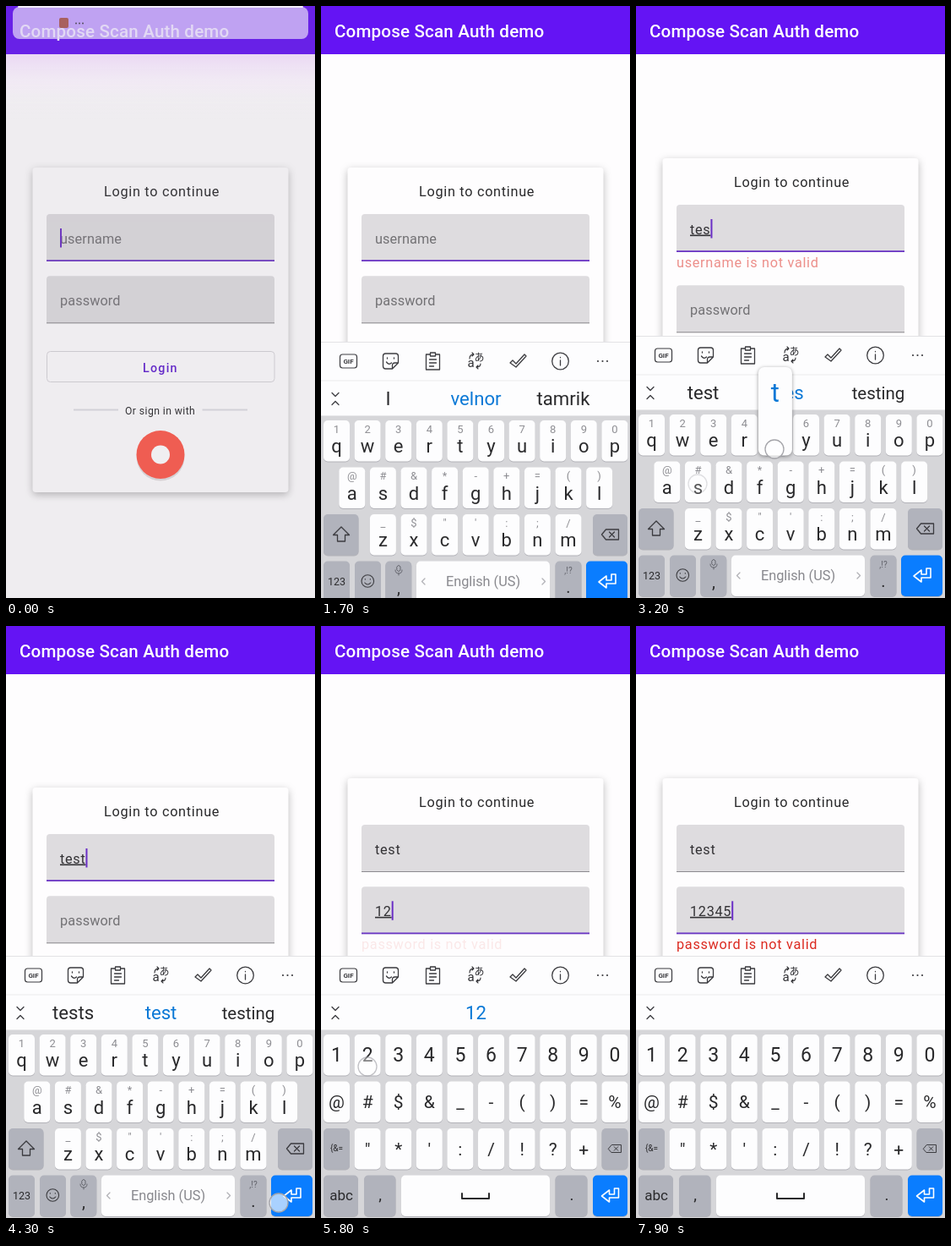
An HTML page that plays this animation: 366x700 px, repeating every 8000 ms.

```html
<!DOCTYPE html>
<html lang="en">
<head>
<meta charset="utf-8">
<title>Login demo</title>
<style>
html, body { margin: 0; width: 100%; height: 100%; overflow: hidden; background: #fefdfe; }
svg { display: block; width: 100vw; height: 100vh; font-family: Roboto, "Noto Sans", sans-serif; }
text { white-space: pre; }
#wash, #card, #lower, #userError, #passError, #keyboard { animation: 8s linear infinite; }
#wash { animation-name: wash; }
#card { animation-name: lift; filter: drop-shadow(0 3px 5px rgba(0, 0, 0, .27)); }
#lower { animation-name: makeRoom; }
#userError { animation-name: userError; }
#passError { animation-name: passError; }
#keyboard { animation-name: slide; }
@keyframes wash { 0%, 1.25% { opacity: 1 } 6.25%, 100% { opacity: 0 } }
@keyframes lift {
  0%, 32.5% { transform: none } 35.6%, 41.9% { transform: translateY(-11px) }
  45.6%, 68.1% { transform: none } 71.9%, 100% { transform: translateY(-11px) }
}
@keyframes makeRoom {
  0%, 32.5% { transform: none } 35.6%, 41.9% { transform: translateY(22px) }
  45.6%, 100% { transform: none }
}
@keyframes userError { 0%, 35.6% { opacity: 0 } 41.9% { opacity: .75 } 45%, 100% { opacity: 0 } }
@keyframes passError { 0%, 71.9% { opacity: 0 } 78%, 100% { opacity: 1 } }
@keyframes slide {
  0%, 15.6% { transform: translateY(312px); animation-timing-function: ease-out }
  22%, 100% { transform: none }
}
</style>
</head>
<body>
<svg id="stage" viewBox="0 0 366 700" preserveAspectRatio="none"></svg>
<script>
const LOOP = 8000, TAP_FADE = 150, BLINK = 500, FOCUS_PASS = 4400, NUMBERS = 4900;
const PURPLE = '#6414f4', INK = '#29292b', BLUE = '#0a78d6';

// Timed states: [start, value]
const userText = [[0, ''], [2500, 't'], [2750, 'te'], [3100, 'tes'], [3300, 'test']];
const passText = [[0, ''], [5400, '1'], [5750, '12'], [6150, '123'], [6500, '1234'], [7500, '12345']];
const suggestions = [
  [0, 'I|velnor|tamrik'], [2500, 'to|t|the'], [2750, 'the|te|test'], [3100, 'test|tes|testing'],
  [3300, 'tests|test|testing'], [FOCUS_PASS, '||'], [5050, '|1|'], [5750, '|12|'], [6150, '||']
];
const blinkStarts = [-200, ...userText.slice(1).map(s => s[0]), FOCUS_PASS, ...passText.slice(1).map(s => s[0])];

// Touches: x, y, down, up, key
const taps = [
  [172, 288, 780, 850],
  [164, 522, 2400, 2500, 't'], [92, 520, 2650, 2750, 'e'],
  [73, 565, 3000, 3100, 's'], [164, 524, 3150, 3300, 't'],
  [323, 682, 4250, 4400], [19, 675, 4800, 4900],
  [19, 520, 4980, 5050, '1'], [55, 521, 5650, 5750, '2'], [92, 521, 6050, 6150, '3'],
  [128, 521, 6400, 6500, '4'], [165, 521, 7400, 7500, '5']
];

const esc = s => s.replace(/&/g, '&amp;').replace(/</g, '&lt;');
const rect = (x, y, w, h, r, fill, more = '') =>
  `<rect x="${x}" y="${y}" width="${w}" height="${h}" rx="${r}" fill="${fill}" ${more}/>`;
const text = (x, y, size, fill, str, more = '') =>
  `<text x="${x}" y="${y}" font-size="${size}" fill="${fill}" ${more}>${esc(str)}</text>`;
const mid = (x, y, size, fill, str, more = '') => text(x, y, size, fill, str, `text-anchor="middle" ${more}`);
const icon = (x, y, d, color = '#3a3a3e', width = 1.3) =>
  `<path transform="translate(${x} ${y})" d="${d}" fill="none" stroke="${color}" stroke-width="${width}" stroke-linejoin="round" stroke-linecap="round"/>`;
const circle = r => `M${-r} 0a${r} ${r} 0 1 0 ${2 * r} 0a${r} ${r} 0 1 0 ${-2 * r} 0`;

const BACKSPACE = 'M-10 0l5-6h15v12h-15zM-1-3l6 6m0-6l-6 6';
const ENTER = 'M10-8v11h-11v5l-9-7 9-7v5h6v-7z';
const SMILE = 'M-3.5 2q3.5 4 7 0M-3-2.5v.6M3-2.5v.6';

const keyPos = {};
const GRAY = '#b1b3bc';
function cap(x, y, w, fill = '#fdfdfe') {
  return rect(x, y + 1, w, 48.5, 5, '#b2b2b8') + rect(x, y, w, 48.5, 5, fill);
}
function row(keys, x0, y, size, drop, hints) {
  return [...keys].map((ch, i) => {
    const x = x0 + 36.6 * i, cx = x + 15.5;
    keyPos[ch] = [cx, y];
    return cap(x, y, 31) + mid(cx, y + drop, size, INK, ch) +
      (hints ? mid(cx, y + 14.5, 13, '#8d8d92', hints[i]) : '');
  }).join('');
}

function field(id, hint) {
  return `<g id="${id}">
    <path d="M48 302v-52q0-4 4-4h262q4 0 4 4v52z" fill="#dedcdf"/>
    <rect class="line" x="48" width="270"/>
    ${text(64, 280.5, 16.27, '#727174', hint, 'class="hint" letter-spacing=".1"')}
    ${text(64, 280.5, 16.27, '#333235', '', 'class="value" letter-spacing=".7"')}
    <rect class="caret" y="263" width="2" height="22.5" fill="#6a2fc6"/>
  </g>`;
}

function page() {
  const error = (id, y, str) => text(48, y, 16.27, '#dc2a20', str, `id="${id}" letter-spacing=".7"`);
  return `
  ${rect(0, 0, 366, 700, 0, '#fefdfe')}
  ${rect(0, 0, 366, 57, 0, PURPLE)}
  ${text(16, 37, 20.6, '#fff', 'Compose Scan Auth demo', 'font-weight="500" letter-spacing=".15"')}
  <g id="card">
    ${rect(31.5, 191, 303, 384, 4, '#fefdfe')}
    ${text(116, 224.5, 16.27, INK, 'Login to continue', 'letter-spacing=".7"')}
    ${field('user', 'username')}
    ${error('userError', 320, 'username is not valid')}
    <g id="lower">
      <g transform="translate(0 73.3)">${field('pass', 'password')}</g>
      ${error('passError', 393, 'password is not valid')}
      ${rect(48.5, 408.5, 269.5, 36, 4, 'none', 'stroke="#d6d4d8"')}
      ${text(162, 432.5, 14.24, '#5f1fd0', 'Login', 'font-weight="500" letter-spacing="1.27"')}
      ${rect(80, 476.5, 53, 2, 0, '#dddce1')}${rect(232.5, 476.5, 53.5, 2, 0, '#dddce1')}
      ${text(141, 482.5, 12.2, INK, 'Or sign in with', 'letter-spacing=".42"')}
      <circle cx="183" cy="533" r="28.5" fill="#000" opacity=".12"/>
      <circle cx="183" cy="530.5" r="28.5" fill="#fe5849"/>
      <circle cx="183" cy="530.5" r="11" fill="#fff"/>
    </g>
  </g>`;
}

function toolbar() {
  return `
  ${rect(0, 390, 366, 312, 0, '#d6d6d9')}
  ${rect(0, 390, 366, 87.5, 0, '#fdfdfe')}
  ${rect(0, 390, 366, 1, 0, '#e2e2e5')}${rect(0, 435.5, 366, 1, 0, '#ebebee')}
  ${rect(22.5, 405, 20, 16, 3, 'none', 'stroke="#3a3a3e" stroke-width="1.2"')}
  ${mid(32.5, 416, 8, '#3a3a3e', 'GIF', 'font-weight="700"')}
  ${icon(82.5, 413, 'M9 2v-8q0-3-3-3h-12q-3 0-3 3v12q0 3 3 3h8zM9 2h-4q-3 0-3 3v4M-4-4v1M4-4v1M-5 1q3 4 6 1')}
  ${icon(132.5, 413, 'M-3-8h-5v18h16v-18h-5M-3-10h6v4h-6zM-4-2h8M-4 2h8M-4 6h5')}
  ${mid(177.5, 420, 15, '#2f2f33', 'a')}
  ${mid(187.5, 413, 12, '#2f2f33', 'あ', 'font-family="Noto Sans CJK JP, Noto Sans CJK, sans-serif"')}
  ${icon(183, 413, 'M-7-3q0-5 5-5m-2-2l2 2-2 2M6 3q0 4-5 4m2-2l-2 2 2 2', '#2f2f33', 1.1)}
  ${icon(233, 413, 'M-9 2l3-3 4 4 10-11 2 2-12 13z')}
  ${icon(283.5, 413, circle(9.8) + 'M0-1v6M0-4.6v.4')}
  ${[328, 333.5, 339].map(x => `<circle cx="${x}" cy="413" r="1.1" fill="#3a3a3e"/>`).join('')}
  ${icon(17, 457.5, 'M-4-7l4 4 4-4M-4 7l4-4 4 4')}
  ${[79.5, 183.5, 287].map((x, i) => mid(x, 465, 22.2, i === 1 ? BLUE : INK, '', 'class="word"')).join('')}`;
}

function letters() {
  return `<g id="letters">
  ${row('qwertyuiop', 3, 483, 22, 38, '1234567890')}
  ${row('asdfghjkl', 21.3, 538.5, 22, 38, '@#&*-+=()')}
  ${row('zxcvbnm', 57.9, 594, 22, 38, '_$"\':;/')}
  ${cap(3, 594, 41.5, GRAY)}${icon(24, 618, 'M0-9l9.5 9.5h-5v7.5h-9v-7.5h-5z')}
  ${cap(322, 594, 41, GRAY)}${icon(342.5, 618, BACKSPACE)}
  ${cap(3, 649.5, 31, GRAY)}${mid(18.5, 678, 12.5, INK, '123')}
  ${cap(40, 649.5, 31, GRAY)}${icon(55.3, 673, circle(7.3) + SMILE, '#3a3a3e', 1.1)}
  ${cap(76.3, 649.5, 31, GRAY)}${icon(92, 660, 'M-2-4q2-3 4 0v4q-2 3-4 0zM-4 0q0 4 4 4t4-4M0 4v2', '#63646c', 1)}
  ${mid(92, 688, 20, INK, ',')}
  ${cap(113, 649.5, 158)}${mid(192, 679, 16.3, '#88888d', 'English (US)')}
  ${icon(121, 673.5, 'M2-3.5l-3.5 3.5 3.5 3.5', '#b0b0b5')}${icon(264, 673.5, 'M-2-3.5l3.5 3.5-3.5 3.5', '#b0b0b5')}
  ${cap(277.5, 649.5, 31, GRAY)}${mid(293, 663.5, 10, '#63646c', ',!?')}${mid(293, 687, 20, INK, '.')}
  ${cap(314, 649.5, 49, '#0a7dff')}${icon(339, 673, ENTER, '#fff', 1.6)}
  </g>`;
}

function numbers() {
  return `<g id="numbers">
  ${row('1234567890', 3, 483, 23, 32)}
  ${row('@#$&_-()=%', 3, 538.5, 21, 31.5)}
  ${row('"*\':/!?+', 39.6, 594, 21, 31.5)}
  ${cap(3, 594, 31, GRAY)}${mid(18.5, 621, 10, INK, '{&=')}
  ${cap(332.5, 594, 31, GRAY)}<g transform="translate(348 618) scale(.75)">${icon(0, 0, BACKSPACE)}</g>
  ${cap(3, 649.5, 41, GRAY)}${mid(24, 678.5, 17, INK, 'abc')}
  ${cap(51, 649.5, 37.5, GRAY)}${mid(70, 679, 19, INK, ',')}
  ${cap(95, 649.5, 176)}${icon(183, 674, 'M-16-3v6h32v-6', INK, 2)}
  ${cap(277.5, 649.5, 38, GRAY)}${mid(297, 679, 19, INK, '.')}
  ${cap(322, 649.5, 41, '#0a7dff')}${icon(342.5, 673, ENTER, '#fff', 1.6)}
  </g>`;
}

function overlay() {
  return `<g id="wash">
  <linearGradient id="glow" x2="0" y2="1"><stop stop-color="#ead6f4" stop-opacity=".9"/><stop offset=".45" stop-color="#f2e8f6" stop-opacity=".6"/><stop offset="1" stop-color="#f0eef1" stop-opacity="0"/></linearGradient>
  ${rect(0, 0, 366, 700, 0, 'rgba(135,130,140,.125)')}
  ${rect(0, 57, 366, 76, 0, 'url(#glow)')}
  ${rect(8, 1, 350, 38, 8, 'rgba(222,208,244,.74)')}
  ${rect(14, 0, 338, 2, 1, '#f3eefa')}
  ${rect(63, 14, 11, 12, 2, '#a8605f')}
  ${[83, 87, 91].map(x => `<circle cx="${x}" cy="20.5" r="1" fill="#55505e"/>`).join('')}
  </g>`;
}

const stage = document.getElementById('stage');
stage.innerHTML = page() +
  `<g id="keyboard">${toolbar()}${letters()}${numbers()}
    <g id="popup">${rect(-20, -56, 40, 104.5, 7, '#fdfdfe', 'style="filter:drop-shadow(0 1px 2px rgba(0,0,0,.4))"')}
    ${mid(0, -15, 31, BLUE, '')}</g>
  </g>` +
  taps.map(([x, y]) => `<circle class="tap" cx="${x}" cy="${y}" r="11" fill="#fff" fill-opacity=".65" stroke="#a5a5aa" stroke-width="1.3"/>`).join('') +
  overlay();

const $ = s => stage.querySelector(s);
const at = (list, t) => list.findLast(s => s[0] <= t)[1];
const show = (el, on) => el.setAttribute('visibility', on ? 'visible' : 'hidden');
const words = stage.querySelectorAll('.word'), tapDots = stage.querySelectorAll('.tap');
const popup = $('#popup');

function setField(id, value, focused, caretOn) {
  const part = name => $(`#${id} .${name}`);
  const val = part('value'), line = part('line'), caret = part('caret');
  val.textContent = value;
  val.setAttribute('text-decoration', focused && value ? 'underline' : 'none');
  show(part('hint'), !value);
  line.setAttribute('y', focused ? 300.2 : 301);
  line.setAttribute('height', focused ? 1.8 : 1);
  line.setAttribute('fill', focused ? '#6a35c4' : '#8c8a8f');
  caret.setAttribute('x', 64 + (value ? val.getComputedTextLength() : 0));
  show(caret, focused && caretOn);
}

function draw(t) {
  const onPass = t >= FOCUS_PASS;
  const since = t - blinkStarts.findLast(b => b <= t);
  const caretOn = Math.floor(since / BLINK) % 2 === 0;
  setField('user', at(userText, t), !onPass, caretOn);
  setField('pass', at(passText, t), onPass, caretOn);

  at(suggestions, t).split('|').forEach((w, i) => {
    words[i].textContent = w;
    words[i].setAttribute('font-size', w.length > 6 ? 20.5 : 22.2);
  });
  show($('#letters'), t < NUMBERS);
  show($('#numbers'), t >= NUMBERS);

  taps.forEach(([, , down, up], i) => {
    tapDots[i].setAttribute('opacity', t < down ? 0 : Math.min(1, Math.max(0, 1 - (t - up) / TAP_FADE)));
  });
  const pressed = taps.find(([, , down, up, key]) => key && t >= down && t < up);
  show(popup, !!pressed);
  if (pressed) {
    const [x, y] = keyPos[pressed[4]];
    popup.setAttribute('transform', `translate(${Math.max(x, 22)} ${y})`);
    popup.lastElementChild.textContent = pressed[4];
  }
}

let start;
function frame(now) {
  start ??= now;
  draw((now - start) % LOOP);
  requestAnimationFrame(frame);
}
draw(0);
requestAnimationFrame(frame);
</script>
</body>
</html>
```
